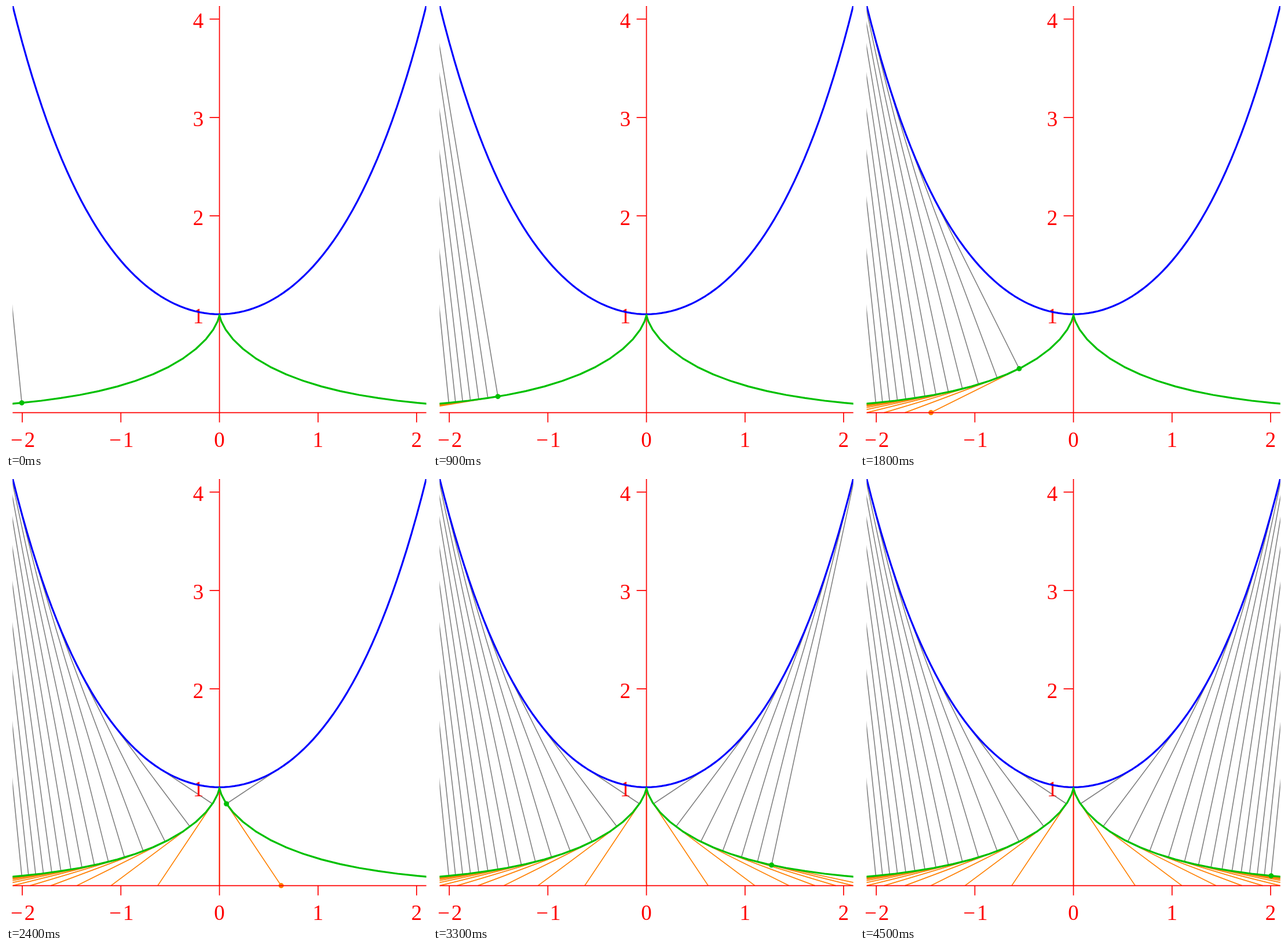
Recreate the animation shown at these times as an HTML page. Size 727x770 px, loop 4.65 s.

```html
<!DOCTYPE html>
<html lang="en">
<head>
<meta charset="utf-8">
<title>Tractrix and catenary</title>
<style>
  html, body { margin: 0; width: 100%; height: 100%; overflow: hidden; background: #fff; }
  svg { display: block; width: 727px; height: 770px; }
  path { fill: none; }
  text { font: 37px "Liberation Serif", serif; fill: #f00; text-anchor: middle; }
  .minus { letter-spacing: 3px; }
</style>
</head>
<body>
<svg viewBox="0 0 727 770">
  <clipPath id="plot"><rect x="11.4" y="0" width="714.4" height="770"/></clipPath>
  <g clip-path="url(#plot)">
    <path id="normals" stroke="#808080" stroke-width="1.6"/>
    <path id="tangents" stroke="#ff8000" stroke-width="1.7"/>
    <circle id="foot" r="4.5" fill="#ff8000"/>
    <circle id="point" r="4.5" fill="#00c000"/>
  </g>
  <path id="axes" stroke="#f00" stroke-width="1.7"/>
  <g id="labels"></g>
  <g clip-path="url(#plot)" stroke-width="3.2" stroke-linejoin="bevel">
    <path id="catenary" stroke="#00f"/>
    <path id="tractrix" stroke="#00c000"/>
  </g>
</svg>
<script>
const STEP_MS = 150, HALF = 15, T_MAX = 3;
const UNIT = 170.25, X0 = 368.6, Y0 = 703.6;
const $ = id => document.getElementById(id);

const toScreen = ([x, y]) => [X0 + x * UNIT, Y0 - y * UNIT];
const coords = p => toScreen(p).map(v => v.toFixed(2)).join(" ");
const segment = (a, b) => `M${coords(a)}L${coords(b)}`;

const onTractrix = t => [t - Math.tanh(t), 1 / Math.cosh(t)];
const onCatenary = t => [t, Math.cosh(t)];
// Steps are equally spaced in arc length along the catenary.
const parameter = step => Math.asinh((step / HALF - 1) * Math.sinh(T_MAX));

function curve(f, from, to, dt) {
  const count = Math.round((to - from) / dt);
  const points = Array.from({ length: count + 1 }, (_, i) => coords(f(from + i * dt)));
  return "M" + points.join("L");
}

function label(text, x, y) {
  const el = document.createElementNS("http://www.w3.org/2000/svg", "text");
  el.textContent = text;
  el.setAttribute("x", x);
  el.setAttribute("y", y);
  if (text.startsWith("−")) el.setAttribute("class", "minus");
  $("labels").append(el);
}

function drawStatic() {
  let axes = `M11.4 ${Y0}H725.8M${X0} 0V${Y0}`;
  for (let n = -2; n <= 2; n++) {
    const x = X0 + n * UNIT;
    axes += `M${x} ${Y0}v17`;
    label(n < 0 ? "−" + -n : String(n), n < 0 ? x + 2.5 : x, 763);
  }
  for (let n = 1; n <= 4; n++) {
    const y = Y0 - n * UNIT;
    axes += `M${X0} ${y}h-17`;
    label(String(n), 332, y + 15.5);
  }
  $("axes").setAttribute("d", axes);
  $("catenary").setAttribute("d", curve(onCatenary, -2.15, 2.15, 0.05));
  $("tractrix").setAttribute("d", curve(onTractrix, -3.2, 3.2, 0.2));
}

function place(id, p) {
  const [x, y] = toScreen(p);
  $(id).setAttribute("cx", x);
  $(id).setAttribute("cy", y);
}

function render(ms) {
  const last = Math.floor(ms / STEP_MS) % (2 * HALF + 1);
  let normals = "", tangents = "";
  for (let step = 0; step <= last; step++) {
    const t = parameter(step), p = onTractrix(t);
    normals += segment(p, onCatenary(t));
    tangents += segment(p, [t, 0]);
  }
  $("normals").setAttribute("d", normals);
  $("tangents").setAttribute("d", tangents);
  const t = parameter(last);
  place("point", onTractrix(t));
  place("foot", [t, 0]);
}

drawStatic();
const start = performance.now();
function tick() {
  render(performance.now() - start);
  requestAnimationFrame(tick);
}
tick();
</script>
</body>
</html>
```
